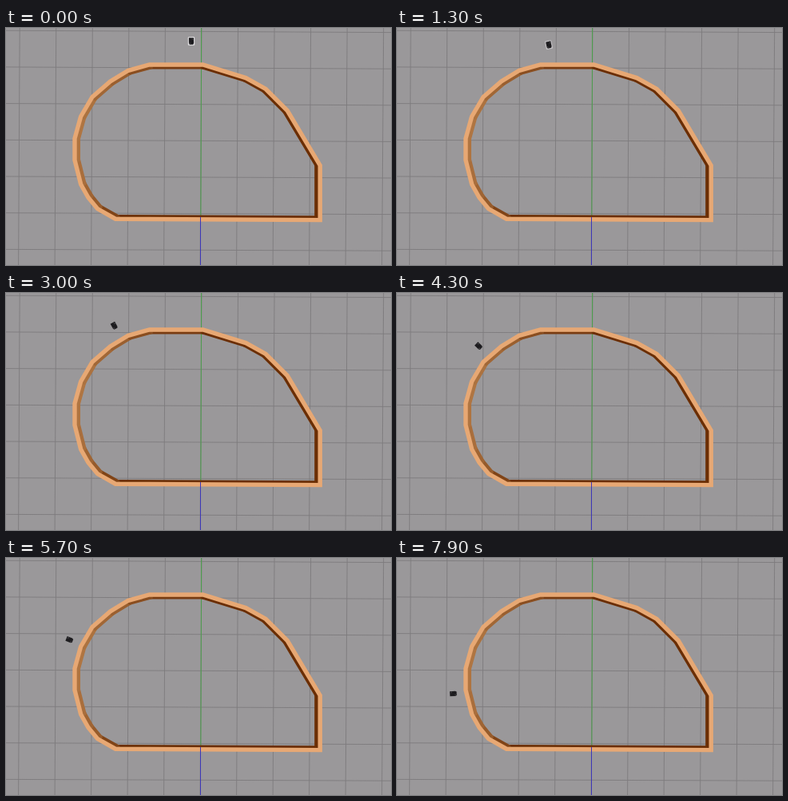
An HTML page for the animation above (8000 ms loop, 482x297 px).

```html
<!DOCTYPE html>
<html lang="en">
<head>
<meta charset="utf-8">
<title>Robot driving round a walled track</title>
<style>
  html, body { margin: 0; width: 100%; height: 100%; overflow: hidden; background: #9a989a; }
  svg { display: block; width: 482px; height: 297px; }
</style>
</head>
<body>
<svg viewBox="0 0 482 297">
  <rect width="482" height="297" fill="#9a989a"/>
  <path id="grid" fill="none" stroke="#7d7b7d" stroke-width=".9"/>
  <path d="M244.6 0L243.9 237" stroke="#4a9f4a"/>
  <g id="faces" stroke-width="5.4" stroke-linecap="round"></g>
  <path id="rim" fill="none" stroke="#e7a874" stroke-width="5.4"/>
  <path d="M243.5 237V297" stroke="#3c36b8"/>
  <g id="robot">
    <rect id="shine" x="-4.2" y="-5.3" width="8.4" height="10.6" rx="1" fill="#e4e2e4"/>
    <path d="M-3.1 -4.2H3.1V2.6L2.2 4.3H-2.2L-3.1 2.6Z" fill="#1d1c1f"/>
    <path d="M1 -3.2L2.2 -1.5M-2.2 2L-1 3.2" stroke="#59575a" stroke-width=".8"/>
  </g>
</svg>
<script>
  const $ = id => document.getElementById(id);
  const LOOP = 8000, STEP = 100, LAST = LOOP - STEP;
  const mix = (a, b, u) => a + (b - a) * u;

  // Slightly tilted ground grid
  let grid = '';
  for (let i = 0; i < 11; i++) grid += `M${17.2 + 45.55 * i} 0L${15.6 + 45.5 * i} 297`;
  for (let i = 0; i < 7; i++) grid += `M0 ${3.2 + 45.7 * i}L482 ${5.6 + 45.6 * i}`;
  $('grid').setAttribute('d', grid);

  // Centre line of the wall top; the foot is the same line, seen farther away
  const wall = [[179.5,46],[246.5,46],[300.3,62.6],[325.2,76.5],[352.2,103.5],[393.2,172.2],[393.2,240.6],[137,239.2],
    [114.5,226.5],[103,212.5],[93.7,196],[86,165.5],[86,138.5],[93.6,111],[108,86.5],[130.5,67],[153,53.3]];
  const foot = wall.map(([x, y]) => [mix(240, x, .972), mix(148, y, .972)]);
  const dark = [107, 46, 4], lit = [176, 118, 67];

  // Faces brighten as they turn toward the light from the right
  function shade([x1, y1], [x2, y2]) {
    const dx = x2 - x1, dy = y2 - y1;
    const light = Math.max(0, (.2 * dx - .97 * dy) / Math.hypot(dx, dy));
    return `rgb(${dark.map((c, i) => Math.round(mix(c, lit[i], light)))})`;
  }

  $('rim').setAttribute('d', 'M' + wall.join('L') + 'Z');
  $('faces').innerHTML = foot.map((p, i) => {
    const q = foot[(i + 1) % foot.length];
    return `<path d="M${p}L${q}" stroke="${shade(p, q)}"/>`;
  }).join('');

  // Bezier control points of the robot's drive
  const drive = [[232,16.4],[173.5,17],[83,43],[67,107],[70.4,170]];

  // Reduce to the last two points: they give both place and heading
  function along(pts, u) {
    while (pts.length > 2) {
      pts = pts.slice(1).map((p, i) => p.map((c, k) => mix(pts[i][k], c, u)));
    }
    const [[x1, y1], [x2, y2]] = pts;
    return {
      x: mix(x1, x2, u),
      y: mix(y1, y2, u),
      turn: -Math.atan2(y2 - y1, x1 - x2) * 180 / Math.PI
    };
  }

  function draw() {
    const u = Math.floor(performance.now() % LOOP / STEP) * STEP / LAST;
    const { x, y, turn } = along(drive, u);
    $('robot').setAttribute('transform', `translate(${x} ${y}) rotate(${turn})`);
    $('shine').setAttribute('opacity', Math.max(0, 1 - 2.6 * u));
    requestAnimationFrame(draw);
  }
  draw();
</script>
</body>
</html>
```
